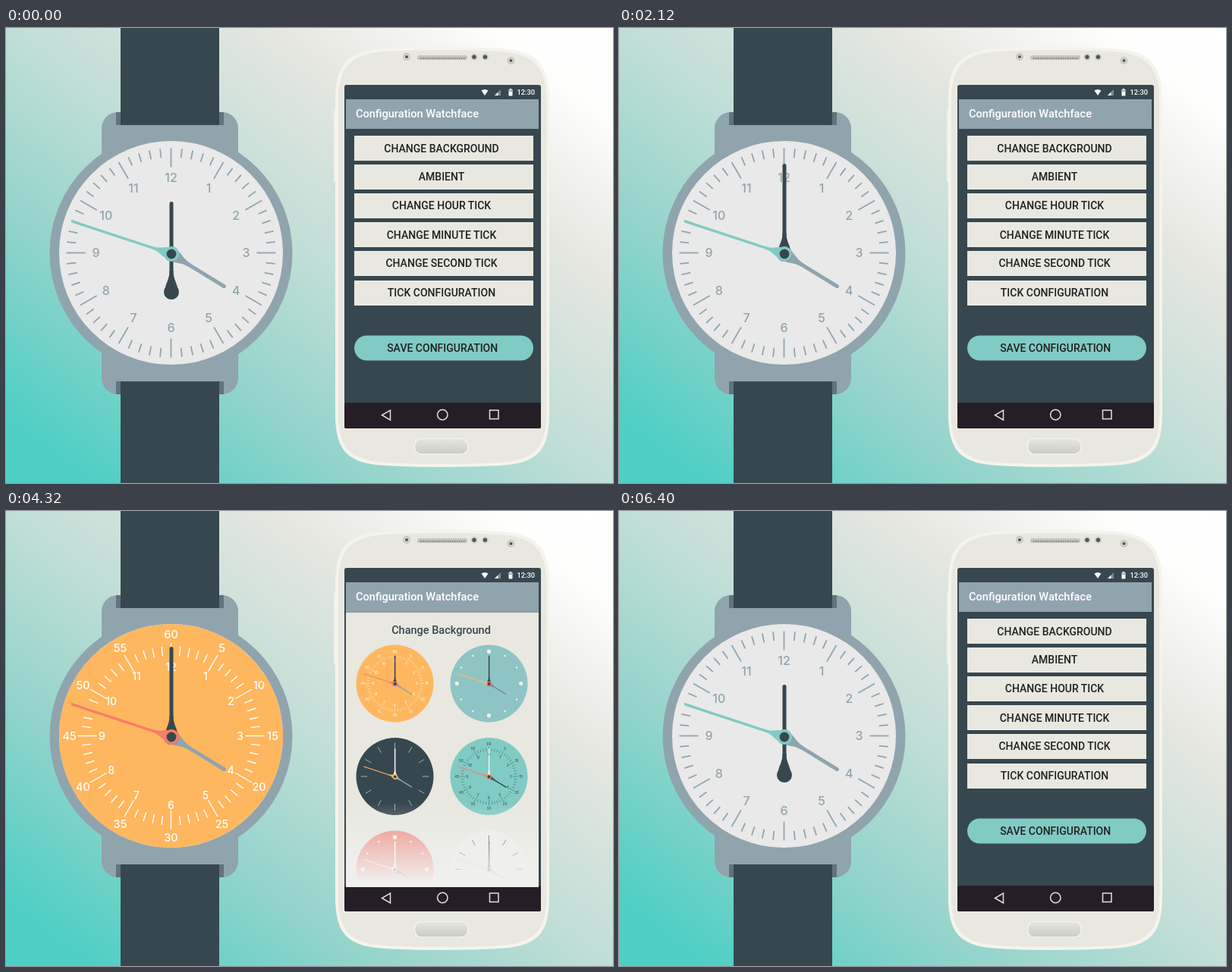
Recreate the animation shown at these times as an HTML page. Size 800 px wide and 600 px high, loop 7000 ms.

```html
<!DOCTYPE html>
<html lang="en">
<head>
<meta charset="utf-8">
<title>Watchface configuration</title>
<style>
  html, body { margin: 0; width: 100%; height: 100%; overflow: hidden; }
  svg { display: block; width: 800px; height: 600px; }
  text { font-family: Roboto, sans-serif; }
  .dial text { font-family: Inter, sans-serif; font-weight: 500; text-anchor: middle; }
  .mid { text-anchor: middle; }
  .med { font-weight: 500; }
</style>
</head>
<body>
<svg id="stage" viewBox="0 0 800 600" xmlns="http://www.w3.org/2000/svg"></svg>
<script>
const LOOP = 7000, STEP = 40;
const DARK = '#37474f', STEEL = '#90a4ae', TEAL = '#80cbc4', PAPER = '#e8e8e1',
      ORANGE = '#ffb75f', CORAL = '#f57f68', INK = '#212121';

const clamp = v => Math.max(0, Math.min(1, v));
const ramp = (t, a, b) => clamp((t - a) / (b - a));
const easeOut = p => 1 - (1 - p) * (1 - p);
const easeInOut = p => p * p * (3 - 2 * p);
const mix = (a, b, p) => a + (b - a) * p;
const range = (n, fn) => Array.from({ length: n }, (_, i) => fn(i)).join('');

const rect = (x, y, w, h, fill, rx = 0, extra = '') =>
  `<rect x="${x}" y="${y}" width="${w}" height="${h}" rx="${rx}" fill="${fill}" ${extra}/>`;
const disc = (x, y, r, fill, extra = '') =>
  `<circle cx="${x}" cy="${y}" r="${r}" fill="${fill}" ${extra}/>`;
const label = (x, y, size, fill, str, cls = '', extra = '') =>
  `<text x="${x}" y="${y}" font-size="${size}" fill="${fill}" class="${cls}" ${extra}>${str}</text>`;

// Dial parts, all centred on 0,0
const polar = (i, r, n = 60) => {
  const a = i / n * 2 * Math.PI;
  return [(r * Math.sin(a)).toFixed(2), (-r * Math.cos(a)).toFixed(2)];
};
const tick = (i, r0, r1, color, w) => {
  const [x0, y0] = polar(i, r0), [x1, y1] = polar(i, r1);
  return `<path d="M${x0} ${y0}L${x1} ${y1}" stroke="${color}" stroke-width="${w}"/>`;
};
const numbers = (r, size, color, k, first) => range(12, i => {
  const [x, y] = polar(i, r, 12);
  return label(x, +y + size * .36, size, color, i ? i * k : first);
});

const marks = {
  plain: c => range(60, i => tick(i, i % 5 ? 126 : 113, 138, c, 1.8)) + numbers(99, 16, c, 1, 12),
  double: c => range(60, i => tick(i, i % 5 ? 106 : 98, i % 5 ? 118 : 123, c, 1.4)) +
    numbers(134, 14.5, c, 5, 60) + numbers(91, 14, c, 1, 12),
  dots: c => range(12, i => disc(...polar(i, 134, 12), i % 3 ? 4 : 8.5, c)),
  bars: c => range(12, i => tick(i * 5, 115, 142, c, 3)),
};

function hand(angle, len, w, r, color) {
  const h = w / 2, k = r * .8, q = r * .6;
  return `<g transform="rotate(${angle})"><path fill="${color}" d="M${r * 2.8} ${-h}
    C${r * 1.8} ${-h} ${r * 1.4} ${-q} ${q} ${-k}A${r} ${r} 0 1 0 ${q} ${k}
    C${r * 1.4} ${q} ${r * 1.8} ${h} ${r * 2.8} ${h}Z"/>
    <path d="M${r * 2.5} 0H${len - h}" stroke="${color}" stroke-width="${w}" stroke-linecap="round"/></g>`;
}

const looks = {
  plain:  { bg: '#e9e9e9', marks: 'plain', ink: STEEL, hour: STEEL, min: DARK, sec: TEAL },
  orange: { bg: ORANGE, marks: 'double', ink: '#fff', hour: STEEL, min: DARK, sec: CORAL },
  mist:   { bg: '#8fc4c5', marks: 'dots', ink: '#f0f0ec', hour: '#78909c', min: DARK, sec: ORANGE, ring: CORAL },
  night:  { bg: DARK, marks: 'bars', ink: TEAL, hour: STEEL, min: '#f0f0ec', sec: ORANGE },
  teal:   { bg: TEAL, marks: 'double', ink: DARK, hour: DARK, min: '#f0f0ec', sec: CORAL },
  rose:   { bg: '#ee8578', marks: 'dots', ink: '#fff', hour: DARK, min: '#fff', sec: '#fff3d0' },
  white:  { bg: '#ededea', marks: 'bars', ink: DARK, hour: STEEL, min: DARK, sec: '#e8c878' },
};

function dial(name, x, y, r, scale) {
  const s = looks[name];
  return `<g class="dial">${disc(x, y, r, s.bg)}
    <g transform="translate(${x} ${y}) scale(${scale})">${marks[s.marks](s.ink)}
    <g transform="translate(.5 1.5)">${hand(31.6, 84, 5, 10, s.hour)}
    <g class="min">${hand(-90, 119, 5, 10, s.min)}</g>
    ${hand(198.2, 139, 3.4, 9.5, s.sec)}
    ${disc(0, 0, 10, s.ring || s.sec)}${disc(0, 0, 6.4, DARK)}</g></g></g>`;
}

const bigDial = name => `<g id="${name}">${dial(name, 217.5, 296.5, 147.5, 1)}</g>`;
const strap = y => rect(145, y ? 466 : 111, 142, 17, '#61737c') + rect(151, y, 130, y ? 134 : 128, DARK);

const watch = rect(126, 111, 180, 372, STEEL, 21) + strap(0) + strap(466) +
  disc(217.5, 297, 160, STEEL) + ['plain', 'orange', 'night'].map(bigDial).join('');

const lens = (x, y, r) => disc(x, y, r, '#c3c3bc') + disc(x, y, r * .72, '#dcdcd5') + disc(x, y, r * .42, '#555');
const body = 'M434 96C434 46 451 30 500 27Q575 23 650 27C699 30 716 46 716 96V509' +
  'C716 559 699 574 650 577Q575 581 500 577C451 574 434 559 434 509Z';

const shell = rect(432, 107, 5, 96, '#f0f0ea', 2) +
  `<path d="${body}" fill="#f4f4ed"/>
   <path d="${body}" fill="${PAPER}" transform="translate(575 302) scale(.974 .986) translate(-575 -302)"/>` +
  lens(528, 38, 5) + lens(665.5, 43, 5) +
  [617, 631.5].map(x => disc(x, 38.3, 4.6, '#d2d2cb') + disc(x, 38.3, 2.7, '#555')).join('') +
  rect(542, 36, 66, 6, '#c4c4bd', 3) +
  `<path d="M546 40H605" stroke="#8c8c87" stroke-width="1.8" stroke-dasharray="1.8 1.2"/>` +
  rect(538.5, 541.5, 70.5, 20.5, 'url(#home)', 9, 'stroke="#f3f3ed" stroke-width="1.5"');

const frame = rect(446, 75, 259, 453, DARK, 3) + rect(448, 94, 254, 39, STEEL) +
  label(461, 118, 14.6, '#fff', 'Configuration Watchface', 'med') +
  `<path d="M626.5 82.5Q631 79.500 635.5 82.500L631 89Z" fill="#fff"/>
   <path d="M644 89L652 81V89Z" fill="#7d8a91"/><path d="M644 89L648.500 84.500V89Z" fill="#fff"/>` +
  rect(662.5, 81, 5, 8.5, '#fff', .8) + rect(663.7, 80, 2.6, 2, '#fff') + rect(662.5, 81.5, 5, 2.5, '#a6b0b5') +
  label(673.5, 88.2, 9.3, '#fff', '12:30', 'med');

const nav = rect(446, 494, 259, 34, '#261e26', 2) +
  `<g fill="none" stroke="#e2e2dc" stroke-width="1.5"><path d="M506.500 504V517L495.500 510.500Z"/>
   <circle cx="575.300" cy="510" r="6.700"/><rect x="637.500" y="504" width="11.500" height="11.500"/></g>`;

const rows = [
  ['CHANGE BACKGROUND', 142, 159], ['AMBIENT', 180, 196], ['CHANGE HOUR TICK', 218, 234],
  ['CHANGE MINUTE TICK', 256, 273], ['CHANGE SECOND TICK', 294, 309.5], ['TICK CONFIGURATION', 333, 349],
];
const save = (x, w, size) => rect(x, 405.5, w, 33, TEAL, 16.5) +
  label(x + w / 2 - 1.8, 422 + size * .36, size, INK, 'SAVE CONFIGURATION', 'mid med');
const menu = rows.map(([name, y, mid]) => rect(459, y, 236, 33, PAPER) +
  label(574, mid + 5, 14, INK, name, 'mid med')).join('') +
  rect(459, 333, 236, 33, '#fff', 0, 'id="press" opacity="0"') + save(459, 236, 14);

const slider = (name, y, x, val, vx, id) => label(465, y - 15.5, 14.2, STEEL, name) +
  label(vx, y - 13.5, 14, STEEL, val, 'mid', `id="${id}Val"`) +
  rect(465, y - .5, 214, 1, STEEL) +
  rect(465, y - 1, x - 465, 2, TEAL, 0, `id="${id}Bar"`) + disc(x, y, 5.2, TEAL, `id="${id}Knob"`);
const ticks = `<g id="ticks">${rect(448, 131, 254, 364, PAPER)}
  ${label(571, 160, 14.5, DARK, 'Tick configuration', 'mid med')}
  ${slider('Second offset', 206.5, 571, 33, 672, 's')}
  ${slider('Minute offset', 257.5, 470, 0, 672, 'm')}
  ${slider('Hours offset', 307.5, 475.5, 2, 674, 'h')}
  ${save(469, 210, 12.6)}</g>`;

const picks = ['orange', 'mist', 'night', 'teal', 'rose', 'white'];
const gallery = `<g id="gallery">${rect(448, 133.5, 254, 362, PAPER)}
  ${label(573.5, 162, 14.5, DARK, 'Change Background', 'mid med')}
  <g clip-path="url(#list)">${picks.map((n, i) =>
    dial(n, 512.5 + i % 2 * 124, 227.5 + Math.floor(i / 2) * 122.5, 51, .315)).join('')}
  ${disc(512.5, 227.5, 51, '#fff', 'id="glowA" opacity="0"')}
  ${disc(512.5, 350, 51, '#fff', 'id="glowB" opacity="0"')}
  ${rect(448, 385, 254, 111, 'url(#veil)')}</g></g>`;

const stage = document.getElementById('stage');
stage.innerHTML = `<defs>
  <linearGradient id="sky" gradientUnits="userSpaceOnUse" x1="112" y1="684" x2="688" y2="-84">
    <stop offset="0" stop-color="#4dcfc4"/><stop offset=".08" stop-color="#50cfc4"/>
    <stop offset=".3" stop-color="#93d4cb"/><stop offset=".5" stop-color="#c0ded7"/>
    <stop offset=".72" stop-color="#e5e7e0"/><stop offset=".9" stop-color="#fefefd"/>
    <stop offset="1" stop-color="#fff"/></linearGradient>
  <linearGradient id="home" x2="0" y2="1"><stop offset="0" stop-color="#e6e6df"/>
    <stop offset="1" stop-color="#cbcbc5"/></linearGradient>
  <linearGradient id="veil" x2="0" y2="1"><stop offset="0" stop-color="#f0f0ee" stop-opacity="0"/>
    <stop offset=".95" stop-color="#f0f0ee"/></linearGradient>
  <clipPath id="list"><rect x="448" y="134" width="254" height="362"/></clipPath></defs>` +
  rect(0, 0, 800, 600, 'url(#sky)') + watch + shell + frame + nav + menu + ticks + gallery +
  disc(0, 0, 17.5, '#e4e4e2', 'id="touch"');

const el = id => document.getElementById(id);
const set = (id, attrs) => { for (const k in attrs) el(id).setAttribute(k, attrs[k]); };
const minHand = el('plain').querySelector('.min');

// start, end, hidden at, from x/y, to x/y, easing
const moves = [
  [80, 400, 640, 735, 409, 575, 348, easeOut],
  [720, 1000, 1000, 555, 494, 470, 257.5, easeOut],
  [1000, 1360, 1400, 470, 257.5, 515, 257.5, easeInOut],
  [1920, 2080, 2120, 575, 494, 575, 424, easeOut],
  [2760, 3440, 3480, 571, 259, 570, 158, easeOut],
  [4200, 4280, 4320, 514, 227, 514, 227, easeOut],
  [5560, 6240, 6280, 515, 348, 500, 510, easeInOut],
];

function touch(t) {
  const m = moves.find(([a, , c]) => t >= a && t < c);
  if (!m) return set('touch', { opacity: 0 });
  const [a, b, , x0, y0, x1, y1, ease] = m, p = ease(ramp(t, a, b));
  set('touch', { cx: mix(x0, x1, p), cy: mix(y0, y1, p), opacity: mix(.28, .45, ramp(t, a, a + 160)) });
}

const pulse = (t, a, b) => t < a || t >= b ? 0 : .2 * Math.sin(Math.PI * (t - a + STEP) / (b - a + STEP));

function draw(t) {
  const drag = easeInOut(ramp(t, 1000, 1400));
  const back = 1 - ramp(t, 6240, 6400);
  const knob = mix(470, 515, drag);
  minHand.setAttribute('transform', `translate(0 ${t >= 6240 ? 50 : 50 * (1 - drag)})`);
  set('mKnob', { cx: knob });
  set('mBar', { width: knob - 465 });
  el('mVal').textContent = Math.round(16 * drag);

  set('orange', { opacity: t < 5720 ? ramp(t, 4160, 4320) : 0 });
  set('night', { opacity: ramp(t, 5560, 5720) * back });
  set('ticks', { visibility: t >= 640 && t < 2120 ? 'visible' : 'hidden' });
  set('gallery', { opacity: ramp(t, 3440, 3680) * back });
  set('press', { opacity: pulse(t, 360, 480) });
  set('glowA', { opacity: pulse(t, 4200, 4320) });
  set('glowB', { opacity: pulse(t, 5600, 5760) });
  touch(t);
}

let start;
function loop(now) {
  start ??= now;
  draw(Math.floor((now - start) % LOOP / STEP) * STEP);
  requestAnimationFrame(loop);
}
draw(0);
requestAnimationFrame(loop);
</script>
</body>
</html>
```
